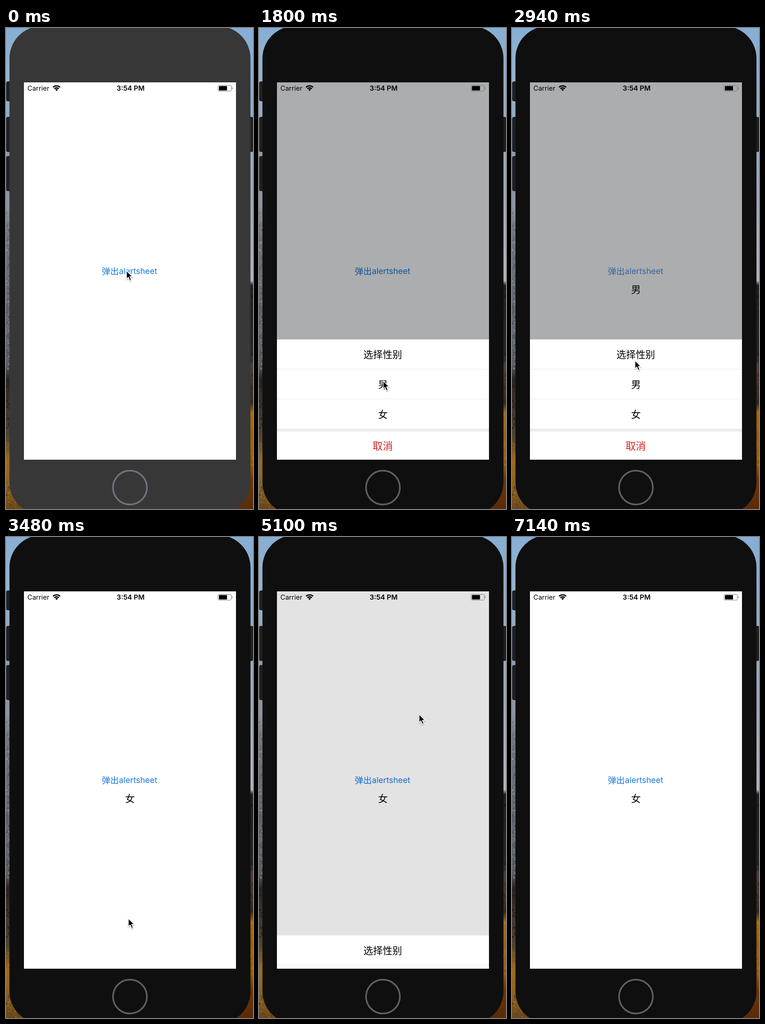
Animation of 537x1044 px, one loop 7200 ms. Source, as an HTML page:

```html
<!DOCTYPE html>
<html lang="zh-CN">
<head>
<meta charset="utf-8">
<title>Action sheet</title>
<style>
  html, body { margin: 0; width: 100%; height: 100%; overflow: hidden; background: #0f0f0f; }
  svg { display: block; width: 537px; height: 1044px; }
  text { font-family: Inter, 'Noto Sans CJK SC', 'Noto Sans CJK', sans-serif; }
  .cjk { font-family: 'Noto Sans CJK SC', 'Noto Sans CJK', sans-serif; font-size: 21px; text-anchor: middle; }
</style>
</head>
<body>
<svg viewBox="0 0 537 1044">
  <defs>
    <linearGradient id="left" x2="0" y2="1">
      <stop offset="0" stop-color="#86aed4"/>
      <stop offset=".11" stop-color="#98b5cf"/>
      <stop offset=".3" stop-color="#8b98aa"/>
      <stop offset=".37" stop-color="#8e949e"/>
      <stop offset=".41" stop-color="#73777d"/>
      <stop offset=".7" stop-color="#5c5f63"/>
      <stop offset=".73" stop-color="#2c2420"/>
      <stop offset=".79" stop-color="#3d3734"/>
      <stop offset=".85" stop-color="#51432f"/>
      <stop offset=".9" stop-color="#a06a1c"/>
      <stop offset=".95" stop-color="#8b6324"/>
      <stop offset="1" stop-color="#6b471a"/>
    </linearGradient>
    <linearGradient id="right" x2="0" y2="1">
      <stop offset="0" stop-color="#86aed4"/>
      <stop offset=".15" stop-color="#92acc6"/>
      <stop offset=".35" stop-color="#a0a8b6"/>
      <stop offset=".525" stop-color="#b4b4bd"/>
      <stop offset=".535" stop-color="#1e2023"/>
      <stop offset=".68" stop-color="#26272a"/>
      <stop offset=".7" stop-color="#4d3d34"/>
      <stop offset=".78" stop-color="#38291f"/>
      <stop offset=".8" stop-color="#a4680f"/>
      <stop offset=".91" stop-color="#8f550c"/>
      <stop offset=".94" stop-color="#6b3509"/>
      <stop offset="1" stop-color="#5a2b08"/>
    </linearGradient>
    <filter id="shade" x="-50%" y="-50%" width="200%" height="200%">
      <feDropShadow dx="0" dy="1.5" stdDeviation="1.3" flood-opacity=".4"/>
    </filter>
    <clipPath id="screen"><rect x="39" y="118" width="461" height="819"/></clipPath>
  </defs>

  <rect width="269" height="1044" fill="url(#left)"/>
  <rect x="269" width="268" height="1044" fill="url(#right)"/>
  <g id="grain"></g>

  <g fill="#1f2023" stroke="#141517">
    <rect x="1" y="116.5" width="12" height="42" rx="3"/>
    <rect x="1" y="193.5" width="12" height="75" rx="3"/>
    <rect x="1" y="278.5" width="12" height="75" rx="3"/>
    <rect x="525" y="193.5" width="12" height="75" rx="3"/>
  </g>
  <rect id="bezel" x="7.5" y="-4" width="524" height="1060" rx="70"/>
  <circle id="home" cx="269.5" cy="997.5" r="36.8" fill="none" stroke-width="3.5"/>

  <g clip-path="url(#screen)">
    <rect x="39" y="118" width="461" height="819" fill="#fff"/>
    <g id="button" fill="#1779dc">
      <text class="cjk" x="226.7" y="534.5" style="font-size:18.5px">弹出</text>
      <text x="245.5" y="534" font-size="17.7">alertsheet</text>
    </g>
    <text id="label" class="cjk" x="269.5" y="575"></text>
    <rect id="dim" x="39" y="118" width="461" height="819" fill="#00070f"/>

    <text x="46.5" y="136" font-size="14.6">Carrier</text>
    <text x="271" y="136" font-size="15" font-weight="600" text-anchor="middle">3:54 PM</text>
    <g fill="none" stroke="#000" stroke-width="2.6">
      <path d="M102.2 128.6A11.3 11.3 0 0 1 117.8 128.6"/>
      <path d="M105.1 131.9A7 7 0 0 1 114.9 131.9"/>
    </g>
    <path d="M110 136.8L107.1 133.8A4.1 4.1 0 0 1 112.9 133.8Z"/>
    <rect x="461" y="124.5" width="29" height="12.5" rx="2.5" fill="none" stroke="#777" stroke-width="1"/>
    <rect x="463" y="126" width="17.5" height="9.5" rx="1"/>
    <path d="M491.5 128.5Q494.5 130.7 491.5 133Z" fill="#777"/>

    <g id="sheet">
      <rect x="39" width="461" height="262" fill="#fff"/>
      <path d="M39 64.5H500M39 129H500" stroke="#e9e9e9"/>
      <rect x="39" y="193.5" width="461" height="6.5" fill="#ececec"/>
      <text class="cjk" x="269" y="40">选择性别</text>
      <text class="cjk" x="269.5" y="105">男</text>
      <text class="cjk" x="269.5" y="169.5">女</text>
      <text class="cjk" x="269" y="239" fill="#d9221f" style="font-size:22px">取消</text>
    </g>
  </g>

  <g id="cursor">
    <path d="M0 0V17.8L4 14L7.2 21.3L10.4 19.9L7.3 12.8H12.8Z" stroke="#fff" stroke-width="1.4" filter="url(#shade)"/>
  </g>
</svg>
<script>
const LOOP = 7200, STEP = 60, SLIDE = 300, SHEET = 261, BOTTOM = 937;
const ACTIVE_AT = 540, GONE_AT = 7110;
const $ = id => document.getElementById(id);

// Each sheet: time it opens, time it closes, value chosen
const sheets = [
  [1000, 1880, '男'],
  [2602, 3110, '女'],
  [4209, 4904, ''],
  [5760, 6440, '']
];

// Pointer stops: time, x, y
const stops = [
  [0, 262, 527], [1120, 262, 527], [1680, 270, 766], [1920, 270, 766],
  [2400, 270, 526], [2760, 270, 526], [3060, 266, 828], [3520, 266, 828],
  [4060, 294, 525], [4380, 294, 525], [4800, 348, 385], [5140, 348, 385],
  [5560, 290, 525], [5880, 290, 525], [6240, 272, 900], [6580, 272, 900],
  [6960, 400, 512], [7140, 540, 310]
];

const clamp = v => Math.min(1, Math.max(0, v));
const ease = v => { v = clamp(v); return v * v * (3 - 2 * v); };

function pointer(t) {
  const i = Math.max(1, stops.findIndex(s => s[0] >= t));
  const [t0, x0, y0] = stops[i - 1], [t1, x1, y1] = stops[i];
  const k = ease((t - t0) / (t1 - t0));
  return [x0 + (x1 - x0) * k, y0 + (y1 - y0) * k];
}

function draw(t) {
  let rise = 0, label = '', alpha = 1;
  for (const [open, close, value] of sheets) {
    rise += ease((t - open) / SLIDE) - ease((t - close) / SLIDE);
    if (value && t >= close) label = value;
    if (t > open - 100 && t < open + 420) alpha = .2 + .8 * clamp((t - open - 130) / 290);
  }
  rise = clamp(rise);
  const active = t >= ACTIVE_AT;
  $('bezel').setAttribute('fill', active ? '#0f0f0f' : '#373737');
  $('home').setAttribute('stroke', active ? '#5f6064' : '#70737f');
  $('button').setAttribute('opacity', alpha);
  $('label').textContent = label;
  $('dim').setAttribute('opacity', rise > .001 ? .33 * (.07 + .93 * rise) : 0);
  $('sheet').setAttribute('transform', `translate(0 ${BOTTOM - SHEET * rise})`);
  $('cursor').setAttribute('transform', `translate(${pointer(t)})`);
  $('cursor').setAttribute('visibility', t < GONE_AT ? 'visible' : 'hidden');
}

// Seeded foliage specks along both edges
function grain() {
  let seed = 7, out = '';
  const rnd = () => (seed = seed * 16807 % 2147483647) / 2147483647;
  const specks = (n, x, y, w, h, color) => {
    for (let i = 0; i < n; i++) {
      out += `<rect x="${x + rnd() * w}" y="${y + rnd() * h}" width="${1 + rnd() * 2}" height="${1 + rnd() * 3}" fill="${color}" opacity="${.2 + rnd() * .5}"/>`;
    }
  };
  specks(130, 0, 400, 7, 350, '#3e4146');
  specks(90, 0, 400, 7, 350, '#a3a6ab');
  specks(60, 0, 750, 9, 120, '#17130f');
  specks(60, 0, 890, 28, 154, '#d08e2a');
  specks(50, 0, 960, 32, 84, '#3c2912');
  specks(50, 531, 560, 6, 260, '#0e0f10');
  specks(40, 531, 830, 6, 130, '#cd861a');
  $('grain').innerHTML = out;
}

grain();
const start = performance.now();
function tick() {
  const t = (performance.now() - start) % LOOP;
  draw(Math.floor(t / STEP) * STEP);
  requestAnimationFrame(tick);
}
draw(0);
requestAnimationFrame(tick);
</script>
</body>
</html>
```
